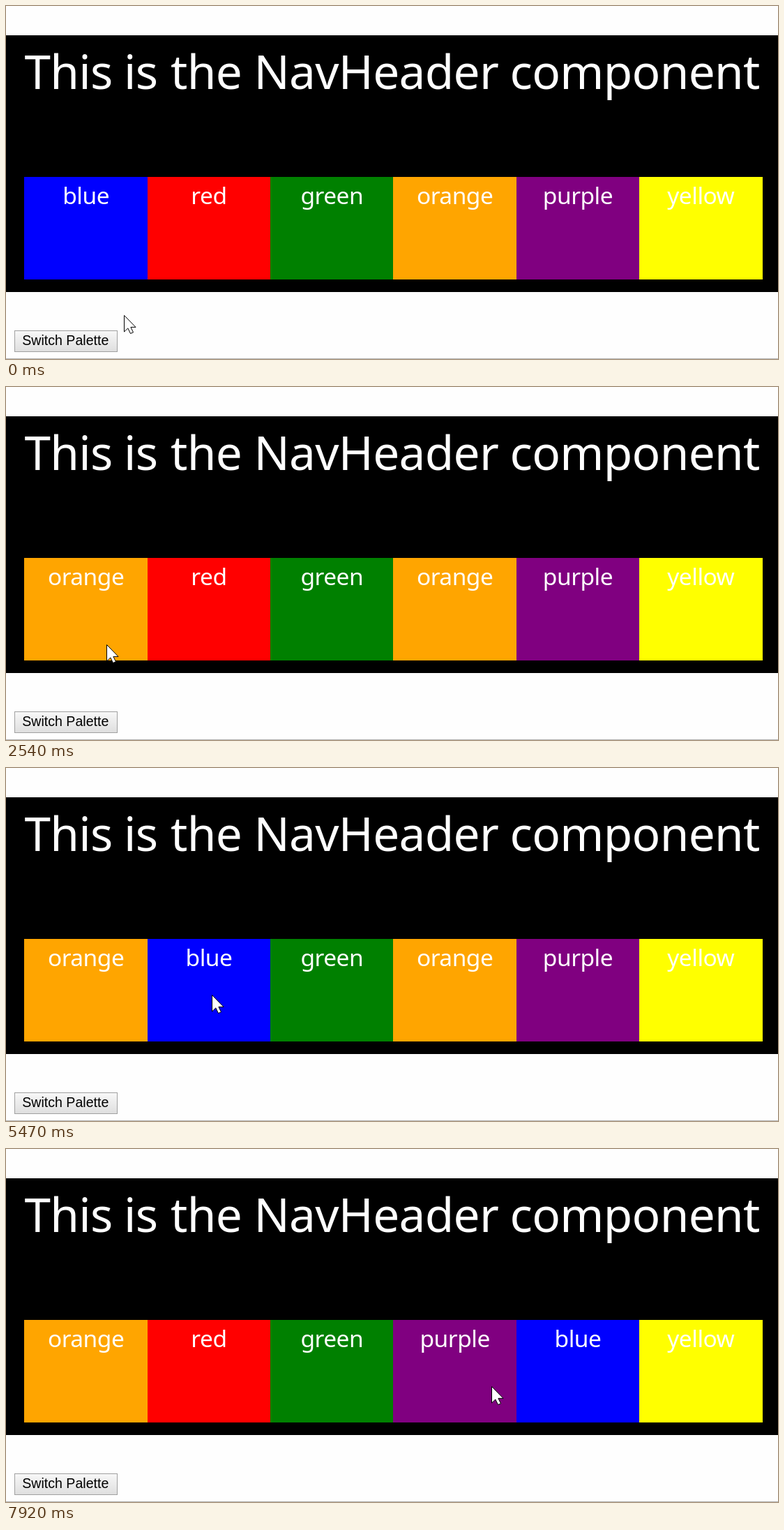
Animation, 1107 px wide and 506 px high, one loop 7990 ms. Source, as an HTML page with a canvas:

```html
<!DOCTYPE html>
<html lang="en">
<head>
<meta charset="utf-8">
<title>Palette switcher</title>
<style>
html, body { margin: 0; height: 100%; overflow: hidden; background: #fefefe; }
canvas { display: block; }
</style>
</head>
<body>
<canvas id="stage" width="1107" height="506"></canvas>
<script>
const ctx = document.getElementById('stage').getContext('2d');
const LOOP = 7990, STEP = 70;
const palette = ['blue', 'red', 'green', 'orange', 'purple', 'yellow'];
const sans = '"Noto Sans", "Open Sans", sans-serif';

// Each click: press time, release time, tile; the tile advances on release
const clicks = [
  [1210, 1280, 0], [1810, 1940, 0], [2470, 2540, 0],
  [3210, 3280, 1], [3810, 3880, 1], [4340, 4410, 1],
  [4870, 4940, 1], [5340, 5470, 1], [5930, 6000, 1],
  [6690, 6760, 4], [6970, 7040, 4], [7660, 7790, 3]
];

// Each move: start time, number of steps, destination
const home = [169.5, 443.5];
const moves = [
  [660, 6, 144.5, 369.5], [2870, 4, 295.5, 325.5], [6200, 7, 857.5, 362.5],
  [7110, 7, 695.5, 341.5], [7920, 1, 696.5, 340.5]
];

const arrow = new Path2D('M0 0V23.5L5.3 18.4L9 26L13 24.3L9.4 16.9H16.5Z');
const ease = p => p * p * (3 - 2 * p);

function cursorAt(t) {
  let [x, y] = home;
  for (const [start, steps, toX, toY] of moves) {
    if (t < start) break;
    const p = ease(Math.min(1, (Math.floor((t - start) / STEP) + 1) / steps));
    x += (toX - x) * p;
    y += (toY - y) * p;
  }
  return [x, y];
}

function rect(color, x, y, w, h) {
  ctx.fillStyle = color;
  ctx.fillRect(x, y, w, h);
}

function text(str, x, y, font, spacing, align = 'left', color = '#fff') {
  ctx.font = font;
  ctx.letterSpacing = spacing + 'px';
  ctx.textAlign = align;
  ctx.fillStyle = color;
  ctx.fillText(str, x, y);
}

function drawHeader() {
  rect('#000', 0, 42, 1107, 368);
  const words = { This: 26.4, is: 169, the: 236, NavHeader: 355.5, component: 722.5 };
  for (const word in words) text(word, words[word], 119, '67.5px ' + sans, -0.7);
}

function drawTiles(t) {
  const edge = i => Math.round(26.4 + 176.35 * i);
  for (let i = 0; i < 6; i++) {
    const count = clicks.filter(([, up, tile]) => tile === i && t >= up).length;
    const name = palette[(i + count) % 6];
    rect(name, edge(i), 245, edge(i + 1) - edge(i), 147);
    text(name, 114.6 + 176.35 * i, 284, '33.5px ' + sans, -0.5, 'center');
  }
}

function drawButton() {
  const shade = ctx.createLinearGradient(0, 465, 0, 496);
  shade.addColorStop(0, '#f8f8f8');
  shade.addColorStop(1, '#dedede');
  rect('#a0a0a0', 12, 465, 148, 31);
  rect(shade, 13, 466, 146, 29);
  text('Switch Palette', 23.2, 486, '19.6px "Liberation Sans", Arial, sans-serif', 0, 'left', '#000');
  rect('#b4b4b4', 0, 505, 1107, 1);
}

function drawCursor(t) {
  const [x, y] = cursorAt(t);
  ctx.save();
  ctx.translate(Math.floor(x) + 0.5, Math.floor(y) + 0.5);
  ctx.fillStyle = '#fff';
  ctx.strokeStyle = '#000';
  ctx.fill(arrow);
  ctx.stroke(arrow);
  if (clicks.some(([down, up]) => t >= down && t < up)) {
    ctx.fillStyle = 'rgba(255, 255, 0, 0.5)';
    ctx.beginPath();
    ctx.arc(0, 0, 18, 0, Math.PI * 2);
    ctx.fill();
  }
  ctx.restore();
}

function frame() {
  const t = performance.now() % LOOP;
  rect('#fefefe', 0, 0, 1107, 506);
  drawHeader();
  drawTiles(t);
  drawButton();
  drawCursor(t);
  requestAnimationFrame(frame);
}
frame();
</script>
</body>
</html>
```
